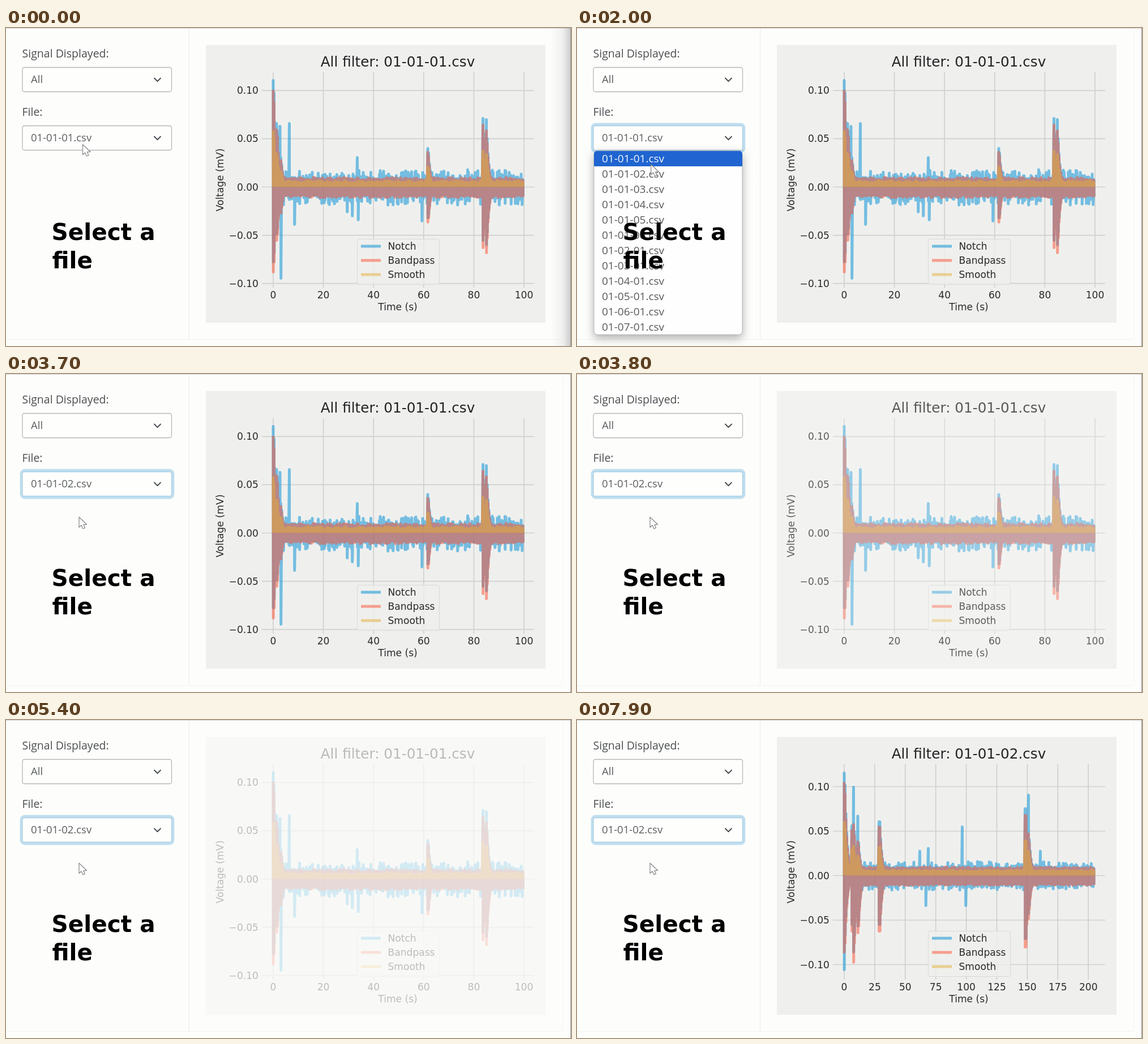
An HTML page with a canvas that plays this animation: 998 by 561 pixels, repeating every 8 s.

```html
<!DOCTYPE html>
<html lang="en">
<head>
<meta charset="utf-8">
<title>Select a file</title>
<style>
html, body { margin: 0; width: 100%; height: 100%; overflow: hidden; background: #fdfefc; }
canvas { display: block; width: 998px; height: 561px; }
</style>
</head>
<body>
<canvas id="stage" width="998" height="561"></canvas>
<script>
const W = 998, H = 561, LOOP = 8000, STEP = 100;
const SANS = '"Open Sans", "Noto Sans", sans-serif';
const PLOT = '"DejaVu Sans", sans-serif';
const ctx = document.getElementById('stage').getContext('2d');

const clamp = v => Math.max(0, Math.min(1, v));
const ramp = (t, from, to) => clamp((t - from) / (to - from));
const smooth = p => p * p * (3 - 2 * p);

function random(seed) {
  return () => {
    seed = (seed * 1664525 + 1013904223) >>> 0;
    return seed / 4294967296;
  };
}

function text(g, str, x, y, font, color, align = 'left') {
  g.font = font;
  g.fillStyle = color;
  g.textAlign = align;
  g.fillText(str, x, y);
}

function line(g, x1, y1, x2, y2, color, width) {
  g.strokeStyle = color;
  g.lineWidth = width;
  g.beginPath();
  g.moveTo(x1, y1);
  g.lineTo(x2, y2);
  g.stroke();
}

function box(g, x, y, w, h, r) {
  g.beginPath();
  g.roundRect(x, y, w, h, r);
}

// ---------- charts ----------

// share: how much of a burst's upper half survives the filter
const SERIES = [
  { name: 'Notch', color: '#30a2da', alpha: 0.64, up: 13, down: 14, tail: 18, share: 1 },
  { name: 'Bandpass', color: '#fc4f30', alpha: 0.5, up: 12, down: 14, tail: 5, share: 0.9 },
  { name: 'Smooth', color: '#e5ae38', alpha: 0.5, up: 7, down: -2.5, tail: 4, share: 0.52 }
];

// bursts: x, height and depth, seen in every series and dying away;
// needles: x and signed height, seen in the notch series only
const CHARTS = [
  {
    file: '01-01-01.csv', zero: 280.5, gap: 85.1, xGap: 88.6, xStep: 20, xCount: 6, tail: 1,
    bursts: [[472, 188, 150], [478, 112, 94], [485, 52, 46], [745, 68, 62],
             [842, 121, 107], [848, 110, 116]],
    needles: [[484, 107], [485, -161], [500, 112], [509, -66], [603, -44], [612, -51],
              [621, 52], [622, -58], [735, -60], [848, 119]]
  },
  {
    file: '01-01-02.csv', zero: 274.5, gap: 78.5, xGap: 53.9, xStep: 25, xCount: 9, tail: 0.65,
    bursts: [[472, 181, 135], [486, 88, 98], [488, 100, 153], [496, 66, 101],
             [534, 95, 98], [792, 118, 126], [797, 82, 76]],
    needles: [[472, -166], [488, 156], [496, 105], [606, 43], [616, -53], [620, 48],
              [681, 86], [686, -53], [797, 142], [818, 43]]
  }
];

function trace(g, chart, s) {
  const rnd = random(77 + s.up * 31 + chart.xCount);
  const step = 1.5, notch = s.share === 1;
  const near = (x, sx) => Math.abs(x - sx) <= step / 2;
  g.beginPath();
  for (let x = 472; x <= 914; x += step) {
    let hi = s.up + s.tail * chart.tail * rnd() ** 3;
    let lo = s.down + (s.down > 0 ? s.tail * chart.tail * rnd() ** 3 : 0);
    for (const [bx, height, depth] of chart.bursts) {
      if (x < bx - step / 2) continue;
      const fade = Math.exp(-Math.max(0, x - bx - 1) / 4);
      hi = Math.max(hi, height * s.share * fade);
      if (s.down > 0) lo = Math.max(lo, depth * (notch ? 0.88 : 1) * fade);
    }
    if (notch) {
      for (const [nx, size] of chart.needles) {
        if (near(x, nx)) [hi, lo] = [Math.max(hi, size), Math.max(lo, -size)];
      }
    }
    g.lineTo(x, chart.zero - hi);
    g.lineTo(x + 0.2, chart.zero + lo);
  }
  g.save();
  g.globalAlpha = s.alpha;
  g.strokeStyle = s.color;
  g.lineWidth = 5;
  g.lineJoin = g.lineCap = 'round';
  g.stroke();
  g.restore();
}

function legend(g) {
  box(g, 620.5, 372.5, 145, 80, 3);
  g.fillStyle = 'rgba(239,240,238,.8)';
  g.fill();
  g.strokeStyle = '#d9dad8';
  g.lineWidth = 1;
  g.stroke();
  SERIES.forEach((s, i) => {
    const y = 385 + i * 25;
    g.globalAlpha = s.alpha;
    line(g, 627, y, 662, y, s.color, 5);
    g.globalAlpha = 1;
    text(g, s.name, 674.5, y + 6, '17.1px ' + PLOT, '#2a2a2a');
  });
}

function renderChart(chart) {
  const layer = document.createElement('canvas');
  layer.width = W;
  layer.height = H;
  const g = layer.getContext('2d');
  const font = '17.1px ' + PLOT, ink = '#2a2a2a';
  g.fillStyle = '#eff0ee';
  g.fillRect(353, 30, 600, 490);

  for (let i = 0; i < chart.xCount; i++) {
    const x = 472 + i * chart.xGap;
    line(g, x, 78, x, 458, '#d0d1cf', 1.7);
    text(g, String(i * chart.xStep), x, 477, font, ink, 'center');
  }
  for (let i = -2; i <= 2; i++) {
    const y = chart.zero - i * chart.gap;
    line(g, 452, y, 933, y, '#d0d1cf', 1.7);
    const label = (i < 0 ? '\u2212' : '') + Math.abs(i * 0.05).toFixed(2);
    text(g, label, 446, y + 6, font, ink, 'right');
  }
  SERIES.forEach(s => trace(g, chart, s));
  legend(g);

  text(g, 'All filter: ' + chart.file, 692, 67.5, '24.7px ' + PLOT, '#222', 'center');
  text(g, 'Time (s)', 692, 498, font, ink, 'center');
  g.save();
  g.translate(383.5, 268);
  g.rotate(-Math.PI / 2);
  text(g, 'Voltage (mV)', 0, 0, font, ink, 'center');
  g.restore();
  return layer;
}

const layers = CHARTS.map(renderChart);

// ---------- interface ----------

const FILES = [];
for (let i = 1; i <= 6; i++) FILES.push(`01-01-0${i}.csv`);
for (let i = 2; i <= 7; i++) FILES.push(`01-0${i}-01.csv`);

const T = { open: 900, close: 2700, closed: 2800, fade: 3700, swap: 7500 };

function pointer(t) {
  const lift = ramp(t, 0, 400), drop = ramp(t, 1300, 2200);
  return [135 + lift - 7.5 * drop, 205 - 6 * lift + 53 * drop];
}

function drawPage(t) {
  ctx.fillStyle = '#fdfefc';
  ctx.fillRect(0, 0, W, H);
  line(ctx, 323.5, 0, 323.5, 549, '#ebecea', 1);
  line(ctx, 0, 549.5, 983, 549.5, '#f3f4f2', 1);
  line(ctx, 983.5, 0, 983.5, 549, '#f5f6f4', 1);
  line(ctx, 0, 0.5, W, 0.5, '#d2d3d1', 1);
  if (t < 800) {
    const shade = ctx.createLinearGradient(962, 0, W, 0);
    shade.addColorStop(0, 'rgba(60,60,65,0)');
    shade.addColorStop(0.6, 'rgba(60,60,65,.07)');
    shade.addColorStop(1, 'rgba(60,60,65,.27)');
    ctx.fillStyle = shade;
    ctx.fillRect(962, 0, 36, H);
  }
  line(ctx, 997.5, 0, 997.5, H, '#8d8e90', 1);
}

function drawSelect(y, value, focus) {
  if (focus > 0) {
    const s = 4.4 * focus;
    box(ctx, 29 - s, y - s, 264 + 2 * s, 44 + 2 * s, 4 + s);
    ctx.fillStyle = '#c0deee';
    ctx.fill();
  }
  box(ctx, 29, y + 0.5, 263.5, 43, 3.5);
  ctx.fillStyle = '#fefffd';
  ctx.fill();
  ctx.strokeStyle = focus > 0 ? '#a9cfe4' : '#b4b6b8';
  ctx.lineWidth = 1.3;
  ctx.stroke();
  text(ctx, value, 44, y + 28, '18.5px ' + SANS, '#5a5c5e');
  ctx.beginPath();
  ctx.moveTo(262, y + 19.5);
  ctx.lineTo(267.5, y + 25);
  ctx.lineTo(273, y + 19.5);
  ctx.strokeStyle = '#4b4f53';
  ctx.lineWidth = 2;
  ctx.lineCap = ctx.lineJoin = 'round';
  ctx.stroke();
  ctx.lineCap = 'butt';
}

function drawList(active, alpha) {
  ctx.save();
  ctx.globalAlpha = alpha;
  ctx.shadowColor = 'rgba(0,0,0,.32)';
  ctx.shadowBlur = 16;
  ctx.shadowOffsetY = 6;
  box(ctx, 30, 216.5, 262, 324.5, 6);
  ctx.fillStyle = '#fefefe';
  ctx.fill();
  ctx.shadowColor = 'transparent';
  ctx.strokeStyle = '#b5b6b8';
  ctx.lineWidth = 1;
  ctx.stroke();
  ctx.clip();
  ctx.fillStyle = '#1f64d0';
  ctx.fillRect(30, 217 + active * 27, 262, 27);
  FILES.forEach((name, i) => {
    text(ctx, name, 44, 237 + i * 27, '19px ' + SANS, i === active ? '#f4f8ff' : '#58595b');
  });
  ctx.restore();
}

function drawPointer([x, y]) {
  ctx.save();
  ctx.translate(x, y);
  ctx.beginPath();
  [[0.5, 0.5], [0.5, 18.5], [4.5, 15], [7.5, 21], [11, 19.5], [8.3, 13.8], [14, 13.3]]
    .forEach(p => ctx.lineTo(...p));
  ctx.closePath();
  ctx.fillStyle = '#fdfdfd';
  ctx.fill();
  ctx.strokeStyle = '#858588';
  ctx.lineWidth = 1.2;
  ctx.stroke();
  ctx.restore();
}

function drawChart(t) {
  const dim = smooth(ramp(t, T.fade, T.fade + 250));
  const back = smooth(ramp(t, T.swap, T.swap + 250));
  ctx.globalAlpha = 1 - 0.7 * (dim - back);
  ctx.drawImage(layers[t < T.swap ? 0 : 1], 0, 0);
  ctx.globalAlpha = 1;
}

function draw(t) {
  const tip = pointer(t);
  const focus = t < T.open ? 0 : 0.4 + 0.6 * ramp(t, T.open + 100, T.open + 300);
  drawPage(t);
  drawChart(t);
  text(ctx, 'Signal Displayed:', 28.5, 51.5, '19.5px ' + SANS, '#4c4e50');
  text(ctx, 'File:', 28.5, 154.5, '19.5px ' + SANS, '#4c4e50');
  drawSelect(69, 'All', 0);
  drawSelect(172, FILES[t < T.close ? 0 : 1], focus);
  if (t >= T.open && t < T.closed) {
    drawList(tip[1] < 244 ? 0 : 1, t < T.close ? 1 : 0.5);
  }
  drawPointer(tip);
  const bold = 'bold 40.6px ' + PLOT;
  text(ctx, 'Select a', 80.5, 374, bold, '#000');
  text(ctx, 'file', 81.5, 424, bold, '#000');
}

const start = performance.now();
function tick() {
  const t = (performance.now() - start) % LOOP;
  draw(Math.floor(t / STEP) * STEP);
  requestAnimationFrame(tick);
}
tick();
</script>
</body>
</html>
```
